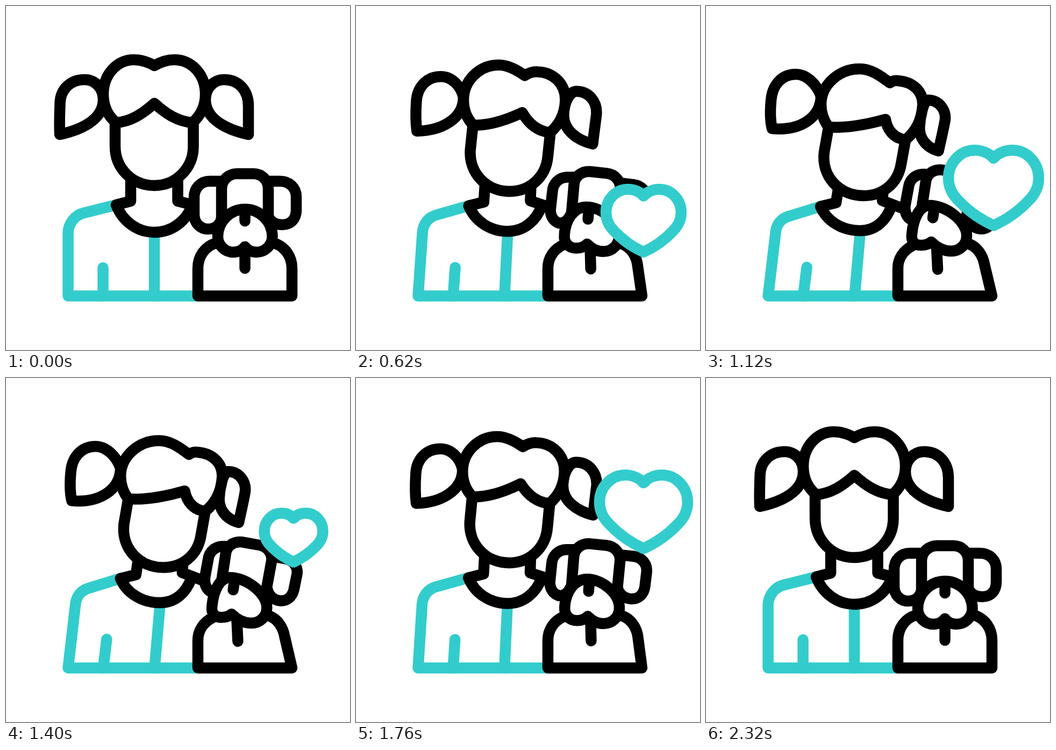
Write an HTML page that moves like this. It is 640x640 px and loops after 2.4 s.

```html
<!DOCTYPE html>
<html lang="en">
<head>
<meta charset="utf-8">
<title>Girl and dog</title>
<style>
html, body { margin: 0; width: 100%; height: 100%; overflow: hidden; background: #fff; }
svg { display: block; width: 100%; height: 100%; }
path { stroke-width: 20.5; stroke-linecap: round; stroke-linejoin: round; }
</style>
</head>
<body>
<svg id="stage" viewBox="0 0 640 640"></svg>
<script>
const LOOP = 2400, HALF = 1180;
const BLACK = "#000", TEAL = "#33cccc";
const stage = document.getElementById("stage");

function addPath(color, fill) {
  const el = document.createElementNS("http://www.w3.org/2000/svg", "path");
  el.setAttribute("stroke", color);
  el.setAttribute("fill", fill);
  stage.appendChild(el);
  return el;
}

// Each part: upright path, leaning path, colour, fill
const parts = [];
function part(from, to, color = BLACK, fill = "none") {
  const nums = to.match(/-?[\d.]+/g).map(Number);
  parts.push({ from, nums, el: addPath(color, fill) });
}

// Shirt
part("M180.5 487L180.5 539.5", "M187.5 486L181 539.5", TEAL);
part("M276 421L276 539.5", "M287 419L276.5 539.5", TEAL);
part("M205 370L145 385C128 389 115.5 405 115.5 423L115.5 539.5L357 539.5",
     "M213 373L153 391.5C140 395.5 131.5 406 129.7 420L115.5 539.5L357 539.5", TEAL);

// Neck and collar
part("M319.5 325L319.5 363L355 372", "M330 340L328 362L367 377");
part("M232 320L232 363L205 370C217 401 245 421 276 421C308 421 335 401 347 370",
     "M246 340L242 366L213 373C225 401 254 418 287 418C315 418 335 400 345 372");

// Pigtails
part("M100 239C99 215 100 200 100.5 181C101 155 120 137 146 137C166 137 181 153 181 174C181 213 137 231 100 239Z",
     "M123 228C119 212 119 197 121 176C123 148 140 127 167 127C188 127 207 147 214 168C213 208 175 233 123 228Z",
     BLACK, "#fff");
part("M451 239C451 215 451 200 451 186C451 156 432 137 406 137C386 137 371 153 371 174C371 213 415 231 451 239Z",
     "M432.5 269.7C437 249 441 233 444.5 214C448 194 434 175 413 175C406 175 399 200 398 219C394 243 408 263 432.5 269.7Z",
     BLACK, "#fff");

// Face and hair
part("M203 218L203 261C203 302 235 334 276 334C316 334 348.5 302 348.5 261L348.5 218",
     "M228 226L220 271C214 317 248 353 293 353C329 353 357 330 363 294L371 250", BLACK, "#fff");
part("M276 111C264 104 251 100 238 100C207 100 181 127 181 164C181 185 189 204 205 217C232 215 254 201 276 181C298 201 320 215 347 217C362 204 371 185 371 164C371 127 345 100 313 100C300 100 288 104 276 111Z",
     "M342 143C325 130 307 117 286 117C247 117 214 147 214 183C214 198 219 213 228 225C262 228 298 221 334 211C337 230 349 246 371 249C390 234 401 212 403 186C405 158 384 141 357 139C352 138 346 140 342 143Z",
     BLACK, "#fff");

// Dog
part("M391 441C370 447 357 466 357 488L357 539.5L532 539.5L532 488C532 466 519 447 498 441",
     "M384 446C367 455 357 470 357 488L357 539.5L532 539.5L518.3 482C515 463 504 448 490 443", BLACK, "#fff");
part("M401 326L379 326C362 326 350 339 350 356L350 388C350 403 361 415 376 415C388 415 398 408 401 395",
     "M409 313L402 313C389 314 379 323 377 336L370.5 371C369.5 381 372 390 379 396C385 396 392 392 397 385", BLACK, "#fff");
part("M488 326L510 326C527 326 540 338 540 355L540 379C540 396 530 407 514 407C503 407 493 402 488 392",
     "M496 332L522 337C535 340 543.5 352 541.5 365L535.5 394C532 408 522 416 509 414.5C498 413 489 405 486 393", BLACK, "#fff");
part("M401 395L401 340C401 324 414 312 430 312L460 312C476 312 488 324 488 340L488 395",
     "M401 378L409 326C411 312 424 303 439 305L472 311C487 314 497 328 494 342L484 395", BLACK, "#fff");
part("M444.5 448C440 454 432 458 423 458C407 458 394 445 394 429C394 401 417 378 444.5 378C472 378 495.5 401 495.5 429C495.5 445 482 458 466 458C457 458 449 454 444.5 448Z",
     "M419 439C414 443 408 445 401 445C388 446 381 437 383 424C386 393 398 371 416 371C447 371 486 401 485 428C485 444 472 456 456 456C443 456 430 450 419 439Z",
     BLACK, "#fff");
part("M444.5 380L444.5 400", "M425 374L422 394");
part("M444.5 448L444.5 488", "M429 449L431 490");

// Heart: outline around its own centre, half width 84.5
const HEART = "M0 -55.5C-8 -64.5 -21 -70.5 -35 -70.5C-63 -70.5 -84.5 -46.5 -84.5 -18.5C-84.5 -1.5 -77 13 -65 24.5C-46 44.5 -22 60.5 0 70.5C22 60.5 46 44.5 65 24.5C77 13 84.5 -1.5 84.5 -18.5C84.5 -46.5 63 -70.5 35 -70.5C21 -70.5 8 -64.5 0 -55.5Z";
const heart = addPath(TEAL, "#fff");
const pulse = [[340, 0], [540, 75], [800, 52], [1130, 84], [1460, 52], [1820, 84], [2160, 0]];
const rise = [[340, 434], [620, 399.5], [1120, 338.5], [1400, 297], [1760, 249], [2160, 199]];

const linear = x => x;
const sine = x => (1 - Math.cos(Math.PI * x)) / 2;
const cubic = x => x < 0.5 ? 4 * x ** 3 : 1 - 4 * (1 - x) ** 3;

function track(keys, t, ease) {
  let i = 1;
  while (i < keys.length - 1 && t > keys[i][0]) i++;
  const [t0, a] = keys[i - 1], [t1, b] = keys[i];
  const x = Math.min(1, Math.max(0, (t - t0) / (t1 - t0)));
  return a + (b - a) * ease(x);
}

function draw(t) {
  const lean = cubic(Math.max(0, 1 - Math.abs(t - HALF) / HALF));
  for (const { from, nums, el } of parts) {
    let i = 0;
    el.setAttribute("d", from.replace(/-?[\d.]+/g, n => (+n + (nums[i++] - n) * lean).toFixed(2)));
  }

  const size = track(pulse, t, sine), y = track(rise, t, linear);
  heart.style.display = size > 0.5 ? "" : "none";
  heart.style.strokeWidth = Math.min(20.5, size);
  const k = size / 84.5;
  let axis = 0;
  heart.setAttribute("d", HEART.replace(/-?[\d.]+/g,
    n => (n * k + (axis++ % 2 ? y : 535)).toFixed(2)));
}

const start = performance.now();
function tick() {
  draw((performance.now() - start) % LOOP);
  requestAnimationFrame(tick);
}
draw(0);
requestAnimationFrame(tick);
</script>
</body>
</html>
```
